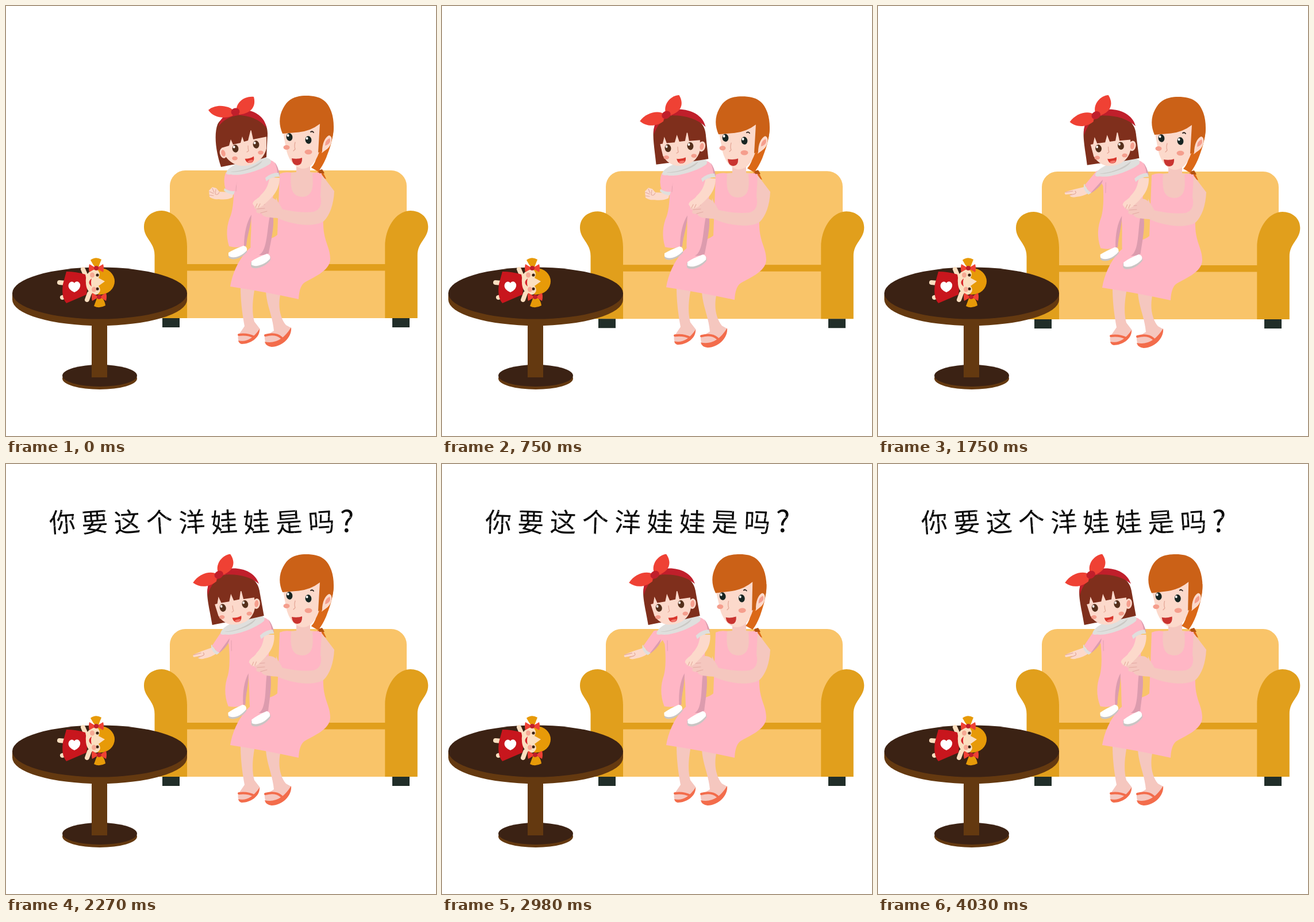
These frames come from a looping animation (748 px wide and 748 px high, 4.2 s). An HTML page:

```html
<!DOCTYPE html>
<html lang="zh">
<head>
<meta charset="utf-8">
<style>
  html, body { margin: 0; width: 100%; height: 100%; overflow: hidden; background: #fff; }
  svg { display: block; width: 100vw; height: 100vh; }
  text { font: 500 46px 'Noto Sans CJK SC', 'Noto Sans CJK', sans-serif; text-anchor: middle; }
</style>
</head>
<body>
<svg id="stage" viewBox="0 0 748 748"></svg>
<script>
const PINK = '#ffb6c5', SHADE = '#dc9cae', SKIN = '#f5c7bf', FACE = '#fcd9cb', BLUSH = '#f59e8d';
const GOLD = '#e19f1c', YELLOW = '#f9c469', HAIR = '#cb6117', TAIL = '#db6817', BROWN = '#7f2f1c';
const RED = '#ef4134', CRIMSON = '#c01f2b', CUFF = '#dfdfdd', WOOD = '#3b2214', EDGE = '#643910';

const path = (d, fill) => `<path d="${d}" fill="${fill}"/>`;
const line = (d, color, w) =>
  `<path d="${d}" fill="none" stroke="${color}" stroke-width="${w}" stroke-linecap="round" stroke-linejoin="round"/>`;
const oval = (x, y, rx, ry, fill, turn = 0) =>
  `<ellipse cx="${x}" cy="${y}" rx="${rx}" ry="${ry}" fill="${fill}" transform="rotate(${turn} ${x} ${y})"/>`;
const rect = (x, y, w, h, fill, r = 0) =>
  `<rect x="${x}" y="${y}" width="${w}" height="${h}" rx="${r}" fill="${fill}"/>`;
const group = (id, ...parts) => `<g id="${id}">${parts.join('')}</g>`;
const placed = (transform, ...parts) => `<g transform="${transform}">${parts.join('')}</g>`;

const eye = (x, y, color) => oval(x, y, 5.4, 6.8, color, -8) + oval(x - 2.4, y - 2.8, 1.9, 2.3, '#fff');

const sofaArm = path('M258.5 543V434C258.5 410 240 405 240 384C240 367 254 356 271 356C298 357 315 388 315 418V543Z', GOLD);
const sofa = rect(285, 286, 412, 220, YELLOW, 27) + rect(300, 449, 374, 94, YELLOW)
  + rect(310, 449, 354, 11.5, GOLD) + sofaArm + placed('matrix(-1 0 0 1 974.3 0)', sofaArm)
  + rect(272, 543, 30, 16, '#212e29') + rect(672, 543, 30, 16, '#212e29');

const motherBody = [
  path('M408 485L433 490C428 515 428 535 432 549L442 562C438 576 425 586 409 587Q402 583 404 573L415 557C410 530 408 510 408 485Z', SKIN),
  path('M452 495L478 498C472 522 477 543 487 555L496 560C495 579 479 592 460 592Q449 588 450 575L466 565C464 540 453 520 452 495Z', SKIN),
  line('M405 572Q420 570 432 576M451 573Q469 568 479 577', '#f36c4b', 4),
  path('M404 582Q424 587 441 562C442 577 425 588 410 588Q405 587 404 582ZM450 584Q477 590 496 559C498 576 480 593 462 593Q452 592 450 584Z', '#f36c4b'),
  path('M543 288L551 288L557 301Q545 297 541 290Z', TAIL),
  path('M505 272L529 272V289L548 291L558 340L480 340L480 291L505 289Z', SKIN),
  path('M476 292Q485 288 496 290C494 315 496 331 515 332C534 331 535 315 533 291Q542 288 549 291L552 382C553 410 564 420 564 440C564 462 531 473 518 482Q510 489 509 510Q450 497 390 488C393 468 403 443 420 425C440 407 463 407 472 398Z', PINK),
  path('M549 293L571 322C570 346 563 364 553 374C537 386 496 381 468 367L470 333L478 353Q513 361 535 358Q552 353 547 330Z', SKIN),
  path('M543 286L550 284L554 291L545 291Z', '#b5520f')
];
const motherHand = path('M481 354C474 339 465 330 453 334L436 340Q432 344 437 346L432 349Q431 353 436 354L435 358Q438 362 444 360Q445 365 453 367Q466 369 478 369Z', SKIN)
  + line('M438 346L450 345M437 353L450 352M443 360L454 357', '#e3a9a2', 1);

const motherHead = [
  path('M548 205L570 210C569 235 562 250 557 264Q550 280 543 288L531 281Q543 270 545 230Z', TAIL),
  path('M481 214L487 247C490 265 501 282 516 283C531 283 541 268 546 250L551 206L515 195Z', FACE),
  path('M481 222C474 206 475 191 482 178C491 160 505 156 522 156C548 156 559 165 566 184C572 201 571 225 565 236L551 251L543 255L546 205Q528 219 504 220Z', HAIR),
  path('M550 253C550 239 555 228 562 225Q568 226 566 237C563 248 556 250 549 256Z', FACE),
  path('M555 243Q555 233 563 230Q567 239 555 243Z', BLUSH),
  eye(493, 228, '#172522'), eye(526, 233, '#172522'),
  line('M530 219Q533 217 535 220', '#2b211c', 1.8),
  line('M503 237Q501 244 503 249L500 252', '#e4a696', 1.3),
  oval(488, 246, 5.5, 4, BLUSH), oval(526, 254, 6.5, 4.2, BLUSH),
  group('mouth', path('M497 265Q507 267 515 264Q516 277 506 277Q498 276 497 265Z', '#c93430'))
];

const girlBody = [
  path('M386 288L450 270Q463 280 468 300L463 345C467 365 463 400 457 430Q442 435 426 432C424 410 428 388 426 366C419 383 416 402 418 417Q403 422 388 418C382 398 384 380 391 364Q397 345 396 310Z', PINK),
  path('M427 363C426 384 419 400 418 417L414 418C414 395 419 375 427 363ZM464 362C468 380 461 408 457 430Q450 434 440 433C455 427 454 385 459 366Z', SHADE),
  line('M401 304L400 322', '#e4a2b1', 1),
  path('M388 430Q397 423 414 418Q420 420 419 428C409 440 392 444 387 437Z', '#c9c5c4'),
  path('M387 429Q397 423 413 417Q420 418 419 425C408 438 392 440 387 434Z', '#fff'),
  path('M426 446Q437 438 455 432Q461 434 460 442C450 455 431 460 426 453Z', '#c9c5c4'),
  path('M427 444Q437 437 454 431Q461 433 459 440C449 451 433 455 427 450Z', '#fff')
];
const girlArm = [
  path('M459 298L476 299C476 324 459 336 446 348Q438 353 433 350L429 344C430 337 440 335 443 329C455 318 456 309 459 298Z', FACE),
  line('M434 350L437 344M439 350L442 344', '#e7afa2', 1.2),
  path('M448 270Q463 263 471 278L476 294Q464 295 454 302Q452 285 448 270Z', PINK),
  path('M467 271Q474 280 476 294L472 295Q473 283 467 271Z', SHADE),
  path('M451 299Q461 290 474 290L476 297Q462 296 453 305Z', CUFF),
  path('M383 291C384 277 430 262 452 264Q464 266 460 274C444 286 407 297 391 293Q384 294 383 291Z', CUFF),
  path('M390 288Q420 288 446 269Q441 280 415 286Q397 290 390 288Z', '#cbc9c5')
];
const sleeve = path('M382 290Q391 288 403 299Q401 314 396 324L382 319Q377 304 382 290Z', PINK)
  + path('M380 317Q388 323 398 322L396 328Q387 328 379 321Z', CUFF);
const bentArm = path('M396 324L394 333Q384 338 370 336Q360 337 354 332L353 321L359 315L366 317L371 323Z', FACE)
  + line('M354 323L361 326M359 317L362 324M365 319L364 327Q368 330 371 324M354 329L361 330', '#e3aa9e', 1.1);
const reachArm = [
  path('M362 314L367 325Q357 331 345 332Q337 334 333 330L338 327L326 328Q323 325 327 323L341 319Z', FACE),
  line('M326 324L339 322M334 329L342 327Q346 325 343 322', '#e0a497', 1.1),
  path('M380 287Q393 284 398 300Q386 313 369 326L360 311Z', PINK),
  path('M371 324L391 302Q390 314 368 327Z', SHADE),
  path('M359 309Q362 319 371 325L366 328Q356 320 358 311Z', CUFF)
];

const ear = (x, y, turn) => oval(x, y, 6, 9, FACE, turn) + oval(x, y, 3.5, 6, BLUSH, turn);
const features = (left, right, nose, mouth, cheeks, tilt) => [
  eye(...left, '#55301c'), eye(...right, '#55301c'),
  placed(`translate(${nose})`, line('M0 -6Q0 0 1 3L-2 5', '#e4a696', 1.2)),
  ...cheeks.map(([x, y]) => oval(x, y, 4.8, 3.4, BLUSH)),
  placed(`translate(${mouth}) rotate(${tilt})`,
    path('M-8 -3Q0 -1 8 -4Q8 6 0 6Q-7 6 -8 -3Z', '#d8352c'), path('M-5 3Q0 0 6 2Q3 6 0 6Q-3 6 -5 3Z', '#f3766b'))
].join('');

const headFront = [
  path('M374 280C364 250 362 222 368 206C376 190 400 184 420 187C446 190 455 205 455 222L453 263L437 268L389 277Z', BROWN),
  path('M374 245C379 262 392 278 412 278C434 278 449 265 453 248V220L395 212L374 225Z', FACE),
  group('frontEar', ear(378, 256, -15)),
  path('M366 216L371 248L388 243L391 232L395 241L408 238L411 227L414 236L421 234L426 214L430 232L455 227Q451 195 412 190Q375 194 366 216Z', BROWN),
  path('M370 209C373 188 397 178 418 181C438 184 451 196 453 212C441 196 420 190 404 190Q382 193 370 209Z', CRIMSON),
  path('M352 181C366 169 389 174 396 182L394 191C380 197 360 194 352 181Z', RED),
  path('M401 183C399 168 415 156 431 158C435 173 429 186 406 189Z', RED),
  oval(399, 184, 7.5, 6.5, CRIMSON, -15),
  group('frontFace', features([399, 248], [435, 241], [421, 249], [424, 267], [[398, 265], [443, 255]], -12))
];
const headTurned = [
  path('M373 274C371 250 367 225 370 212C376 194 395 187 418 188C445 190 459 205 460 222L464 266L435 270L392 272Z', BROWN),
  path('M380 236L385 259C391 270 400 277 414 277C434 277 448 264 450 248V222L390 216Z', FACE),
  ear(453, 244, 12),
  path('M371 218L379 239L385 238L388 226L392 237L406 236L410 223L414 235L424 234L428 216L431 234L450 233L455 235L460 225Q456 191 415 188Q377 193 371 218Z', BROWN),
  path('M370 222Q368 196 388 190L397 181C421 174 455 184 460 210C447 196 424 189 402 189Q378 197 370 222Z', CRIMSON),
  path('M346 198C358 182 380 179 389 187L387 199C375 208 358 209 346 198Z', RED),
  path('M391 184C387 168 402 154 415 154C422 166 422 182 399 189Z', RED),
  oval(392, 188, 8, 6.5, CRIMSON, -25),
  features([394, 246], [433, 243], [411, 250], [417, 267], [[391, 262], [439, 260]], -4)
];

const table = oval(163, 648, 65, 19, EDGE) + oval(163, 643, 65, 19, WOOD) + rect(149, 540, 27, 106, EDGE)
  + oval(163, 511, 152, 45, EDGE) + rect(11, 499, 304, 12, EDGE) + oval(163, 499.5, 152, 45, WOOD);
const dollBow = path('M0 0L-12 -7Q-14 0 -12 7ZM0 0L12 -7Q14 0 12 7Z', RED) + oval(0, 0, 4, 4, CRIMSON);
const dollSkin = '#fbdfc0';
const doll = [
  line('M93 481L104 482M98 507L108 504M134 458L140 472M145 500L141 511', dollSkin, 8),
  path('M105 462Q122 462 138 467Q143 485 140 502Q126 508 105 517Q96 507 99 484Z', '#c8161d'),
  path('M119 498C112 495 107 490 109 484C112 478 117 479 119 482C121 478 127 478 129 484C130 490 126 495 119 498Z', '#fff'),
  path('M157 457Q151 450 147 442Q156 435 166 441Q162 451 160 457ZM163 504Q172 511 173 521Q162 527 153 522Q157 511 160 504Z', '#e79a08'),
  oval(164, 479, 25, 23, '#e79a08'),
  path('M139 481C138 468 144 458 158 458Q166 464 161 473L172 479L161 487Q168 496 158 502C145 503 139 492 139 481Z', dollSkin),
  placed('translate(157 456)', dollBow), placed('translate(162 506)', dollBow),
  oval(159, 468, 2.6, 2.6, '#3b2214'), oval(159, 492, 2.6, 2.6, '#3b2214'),
  oval(150, 468, 4, 4.5, '#f6a993'), oval(153, 493, 4, 4.5, '#f6a993'),
  path('M149 474Q140 481 149 488Q147 481 149 474Z', '#d7262b')
].join('');

const letters = [...'你要这个洋娃娃是吗'].map((c, i) =>
  `<text class="letter" x="${98 + i * 56.3}" y="118" fill="url(#ink)">${c}</text>`).join('')
  + '<text x="593" y="118" fill="url(#ink)" style="font-size:52px">?</text>';
const ink = `<defs><pattern id="ink" width="37" height="29" patternUnits="userSpaceOnUse">${rect(0, 0, 37, 29, '#0a0a0a')}
  ${line('M3 7l5-2M19 4l3 5M29 17l5-1M9 21l4-3M23 25l3-2', '#ddd', .9)}</pattern></defs>`;

const stage = document.getElementById('stage');
stage.innerHTML = ink
  + group('seated', sofa, ...motherBody, group('motherHead', ...motherHead), group('girlBody', ...girlBody),
    motherHand, group('bent', group('bentHand', bentArm), sleeve), group('reach', ...reachArm),
    group('girlArm', ...girlArm))
  + group('headFront', ...headFront) + group('headTurned', ...headTurned)
  + table + doll + group('caption', letters);

const el = id => document.getElementById(id);
const move = (id, transform) => el(id).setAttribute('transform', transform);
const show = (id, on) => el(id).setAttribute('visibility', on ? 'visible' : 'hidden');

// Each track is a list of [start ms, value] holds.
const REST = [0, 0, 0], LEAN = [-3, 3, -6], STRETCH = [-11, 4, -5];
const tracks = {
  sink: [[0, 0], [300, .4], [450, 0], [600, .8], [750, 1.2], [900, 2], [1920, 1], [2450, 2], [2810, 1],
    [3320, 2], [3490, 1], [3670, 2], [4030, 1]],
  pose: [[0, 0], [150, 1], [600, 2], [750, 3], [900, 4], [1750, 5], [1920, 6], [2450, 5], [2810, 6],
    [3320, 5], [3490, 6], [3670, 5], [4030, 6]],
  nod: [[0, 0], [900, -1], [1070, 0], [1410, 1], [1580, .4], [1750, 0], [2090, 1], [2270, 0], [2980, 1], [3150, 0], [4030, 1]],
  mouth: [[0, 1], [1240, .75], [1410, 1], [2450, .7], [2630, 1], [3670, .7], [3850, 1]],
  fist: [[0, [0, 0]], [1070, [-7, -7]], [1240, [-13, 4]]],
  reach: [[0, null], [1410, [8, 2, -8]], [1580, [7, 0, 0]], [1750, REST], [1920, LEAN], [2090, STRETCH], [2270, LEAN],
    [2450, REST], [2810, LEAN], [2980, STRETCH], [3150, LEAN], [3320, REST], [3490, LEAN], [3670, REST], [4030, LEAN]],
  wobble: [[0, -1], [2270, 0], [2450, 1], [2630, 2], [2810, 0], [2980, 1], [3150, 2], [3320, 0], [3670, 1], [3850, 2], [4030, 0]]
};
const at = (name, t) => tracks[name].findLast(([start]) => start <= t)[1];

const poses = [
  { x: 0, y: 0, turn: 0, face: 0, lean: 0 },
  { x: -5, y: 1.5, turn: 0, face: -5, lean: 0 },
  { x: -3, y: 0, turn: -2, face: -5, lean: 0 },
  { turned: true, x: -1, y: 1, turn: -1, lean: 0 },
  { turned: true, x: 0, y: 0, turn: 0, lean: 0 },
  { turned: true, x: -10.5, y: 1, turn: -2.4, lean: -2 },
  { turned: true, x: -17, y: 2.5, turn: -5, lean: -3.8 }
];

function draw(now) {
  const t = now % 4200;
  const pose = poses[at('pose', t)], nod = at('nod', t), reach = at('reach', t), wobble = at('wobble', t);

  move('seated', `translate(0 ${at('sink', t)})`);
  move('motherHead', `translate(${-2.5 * nod} ${-nod}) rotate(${-2.2 * nod} 545 290)`);
  move('mouth', `translate(0 265) scale(1 ${at('mouth', t)}) translate(0 -265)`);

  const lean = `rotate(${pose.lean} 425 440)`;
  move('girlBody', lean);
  move('girlArm', lean);
  show('bent', !reach);
  show('reach', reach);
  move('bentHand', `translate(${at('fist', t)})`);
  if (reach) move('reach', `translate(${reach[0]} ${reach[1] - 2}) rotate(${reach[2]} 385 295)`);

  show('headFront', !pose.turned);
  show('headTurned', pose.turned);
  show('frontEar', !pose.turned && !pose.face);
  move(pose.turned ? 'headTurned' : 'headFront', `translate(${pose.x} ${pose.y}) rotate(${pose.turn} 413.5 244)`);
  if (!pose.turned) move('frontFace', `translate(${pose.face} ${-pose.face * .4})`);

  show('caption', wobble >= 0);
  document.querySelectorAll('.letter').forEach(letter => {
    const turn = [-4, 2, 7][Math.max(wobble, 0)];
    letter.setAttribute('transform', `rotate(${turn} ${letter.getAttribute('x')} 101)`);
  });
}

const start = performance.now();
function tick() {
  draw(performance.now() - start);
  requestAnimationFrame(tick);
}
tick();
</script>
</body>
</html>
```
